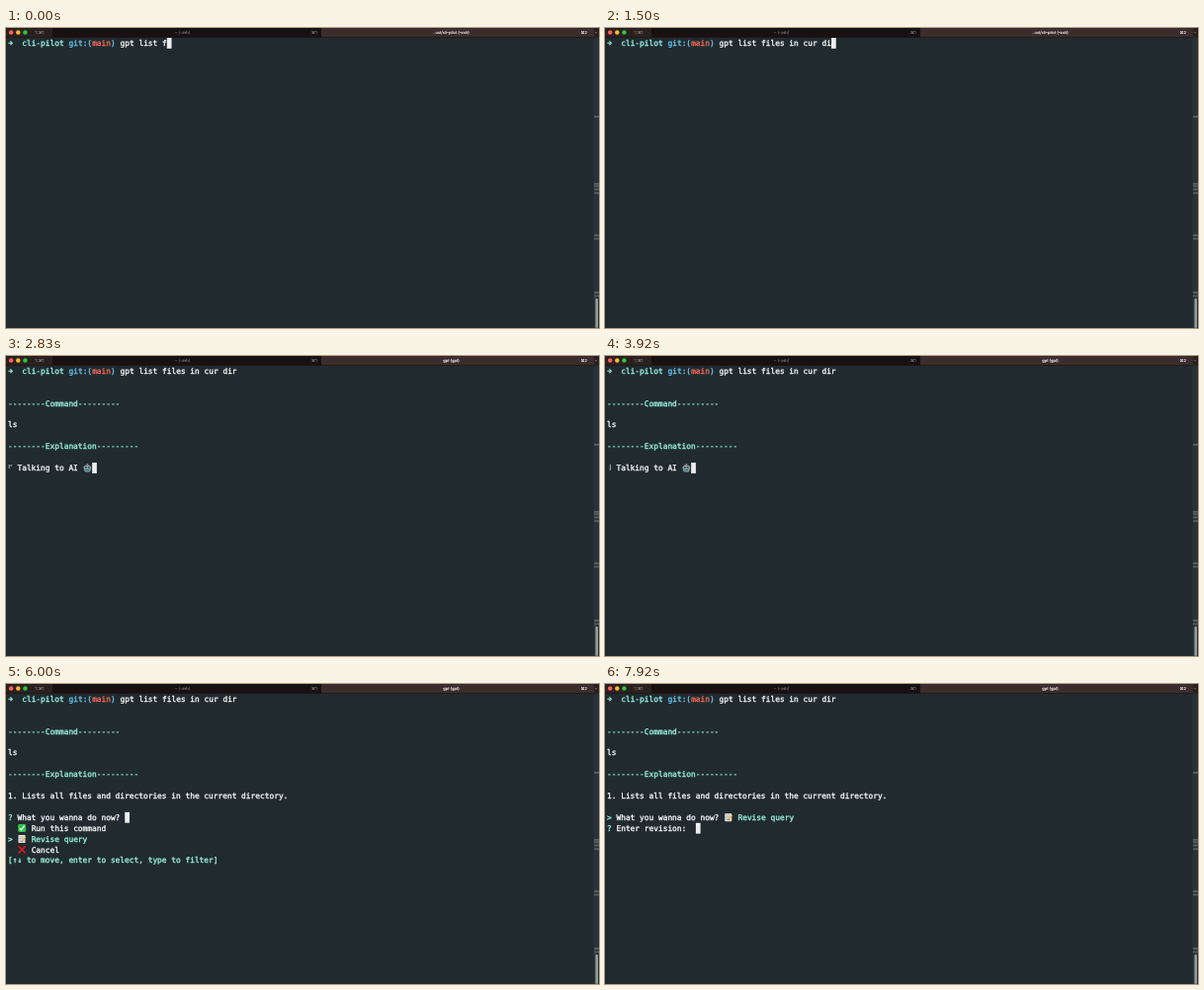
Recreate the animation shown at these times as an HTML page. Size 600 px wide and 304 px high, loop 8 s.

```html
<!DOCTYPE html>
<html lang="en">
<head>
<meta charset="utf-8">
<title>Terminal session</title>
<style>
  html, body { margin: 0; width: 100%; height: 100%; overflow: hidden; background: #212b2f; }
  svg { display: block; width: 100vw; height: 100vh; }
  text { white-space: pre; text-rendering: geometricPrecision; }
  .term { font: 7.857px "DejaVu Sans Mono", monospace; }
  .term text { stroke-width: .3px; }
  .tab { font: 4.05px Inter, "Open Sans", sans-serif; }
</style>
</head>
<body>
<svg viewBox="0 0 600 304" xmlns="http://www.w3.org/2000/svg">
  <rect width="600" height="304" fill="#212b2f"/>
  <g id="bar">
    <rect width="600" height="9.5" fill="#2a2020"/>
    <rect x="47" width="272" height="9.5" fill="#171112"/>
    <rect x="319" width="276" height="9.5" fill="#3a2d2c"/>
    <rect y="9" width="600" height=".6" fill="#171314"/>
    <circle cx="5.2" cy="4.5" r="2.2" fill="#ff5f57"/>
    <circle cx="12.3" cy="4.5" r="2.2" fill="#febc2e"/>
    <circle cx="19.4" cy="4.5" r="2.2" fill="#28c840"/>
    <g class="tab" fill="#a39c9c">
      <text x="28.5" y="6">⌥⌘1</text>
      <text x="178.5" y="6" text-anchor="middle">~ (-zsh)</text>
      <text x="309" y="6">⌘1</text>
      <g fill="#f6f2f2" stroke="#f6f2f2" stroke-width=".12">
        <text id="title" x="450.5" y="6" text-anchor="middle"></text>
        <text x="581.5" y="6">⌘2</text>
      </g>
    </g>
    <rect x="596.2" y="4" width="1.4" height="1.2" fill="#7d6a66"/>
  </g>
  <g id="scroll">
    <rect x="594.5" y="9.5" width="5.5" height="294.5" fill="#293337"/>
    <rect x="596.4" y="274" width="2.6" height="30" rx="1.3" fill="#959a9c"/>
  </g>
  <g id="screen" class="term"></g>
</svg>
<script>
const LOOP = 8000, CELL = 4.73, LINE = 10.9, LEFT = 2;
const WHITE = '#fbfdfd', CYAN = '#9afaf2', MINT = '#9cf8e6', BLUE = '#6ccbf4', RED = '#ff6a5c';
const ENTER = 1750, WAIT = 1830, HEADINGS = 2580, MENU = 4080, MOVE = 5330, CHOOSE = 6670;
const TAIL = 'iles in cur dir';
const KEY_TIMES = [80, 420, 500, 590, 670, 830, 920, 1000, 1080, 1080, 1170, 1250, 1330, 1500, 1580];
const SPINNER = '⠋⠙⠹⠸⠼⠴⠦⠧⠇⠏';
const OPTIONS = [['check', 'Run this command'], ['memo', 'Revise query'], ['cross', 'Cancel']];

const screen = document.getElementById('screen');
const title = document.getElementById('title');

const colX = col => LEFT + col * CELL;
const rowY = row => 10 + row * LINE;

const write = (col, row, str, ink = WHITE) =>
  `<text x="${colX(col)}" y="${rowY(row) + 7.9}" fill="${ink}" stroke="${ink}">${str.replace(/>/g, '&gt;')}</text>`;

const cursor = (col, row) =>
  `<rect x="${colX(col)}" y="${rowY(row)}" width="${CELL}" height="10.8" fill="#eceff0"/>`;

// Icons are drawn in a box two cells wide and one line high.
const ICONS = {
  check: `<rect x=".7" y="1.2" width="8" height="8" rx="1.4" fill="#2fc24a"/>
    <path d="M2.5 5.4 4.1 7.2 7 2.9" fill="none" stroke="#fff" stroke-width="1.3"/>`,
  memo: `<rect x="1" y="1.3" width="7" height="8" rx=".6" fill="#e6e4dd"/>
    <path d="M2 3.2h4.5M2 4.8h4M2 6.4h2.6M2 8h4.6" stroke="#8e969a" stroke-width=".5"/>
    <path d="M4.8 7.4 8.4 3.2" stroke="#e5ad3a" stroke-width="1.4"/>
    <path d="M4.2 8.1 4.9 7.3" stroke="#4a3a2c" stroke-width=".9"/>`,
  cross: `<path d="M1.6 2 7.8 8.4M7.8 2 1.6 8.4" stroke="#dc1a14" stroke-width="1.6" stroke-linecap="round"/>`,
  robot: `<rect x="3.9" y=".9" width="1.5" height="2" fill="#c5694f"/>
    <rect x=".6" y="4" width="8.1" height="2.6" rx="1" fill="#b9784f"/>
    <rect x="1.4" y="2.3" width="6.5" height="7" rx="1.7" fill="#7fa3ac"/>
    <circle cx="3.2" cy="4.8" r=".9" fill="#23464f"/><circle cx="6.1" cy="4.8" r=".9" fill="#23464f"/>
    <rect x="2.8" y="7" width="3.7" height="1.1" fill="#3b5a62"/>`
};
const icon = (name, col, row) =>
  `<g transform="translate(${colX(col)} ${rowY(row)})">${ICONS[name]}</g>`;

function spinner(t, row) {
  const step = Math.floor((t + 45) * 12 / 1000) - 34;
  const bits = SPINNER.charCodeAt((step % 10 + 10) % 10) - 0x2800;
  let out = '';
  for (let i = 0; i < 6; i++) {
    if (bits >> i & 1) {
      const x = LEFT + 1.2 + Math.floor(i / 3) * 2.1, y = rowY(row) + 2.8 + i % 3 * 2;
      out += `<circle cx="${x}" cy="${y}" r=".65" fill="${WHITE}"/>`;
    }
  }
  return out + write(2, row, 'Talking to AI') + icon('robot', 16, row) + cursor(18, row);
}

function prompt(t) {
  const query = 'gpt list f' + TAIL.slice(0, KEY_TIMES.filter(k => k <= t).length);
  return `<path d="M2.4 15.3H5.2M4.4 13.4 6.3 15.3 4.4 17.2" fill="none" stroke="${MINT}" stroke-width="1.1"/>`
    + write(3, 0, 'cli-pilot', CYAN)
    + write(13, 0, 'git:(', BLUE) + write(18, 0, 'main', RED) + write(22, 0, ')', BLUE)
    + write(24, 0, query)
    + (t < ENTER ? cursor(24 + query.length, 0) : '');
}

const headings = () =>
  write(0, 3, '--------Command---------', MINT) + write(0, 5, 'ls')
  + write(0, 7, '--------Explanation---------', MINT);

function menu(selected) {
  let out = write(0, 11, '?', MINT) + write(2, 11, 'What you wanna do now?') + cursor(25, 11);
  OPTIONS.forEach(([name, label], i) => {
    const on = i === selected, row = 12 + i;
    out += (on ? write(0, row, '>', MINT) : '') + icon(name, 2, row) + write(5, row, label, on ? MINT : WHITE);
  });
  return out + write(0, 15, '[↑↓ to move, enter to select, type to filter]', MINT);
}

const revision = () =>
  write(0, 11, '>', MINT) + write(2, 11, 'What you wanna do now?')
  + icon('memo', 25, 11) + write(28, 11, 'Revise query', MINT)
  + write(0, 12, '?', MINT) + write(2, 12, 'Enter revision:') + cursor(19, 12);

function view(t) {
  let out = prompt(t);
  if (t >= ENTER && t < WAIT) out += cursor(0, 1);
  if (t >= WAIT && t < HEADINGS) out += spinner(t, 1);
  if (t >= HEADINGS) out += headings();
  if (t >= HEADINGS && t < MENU) out += spinner(t, 9);
  if (t >= MENU) {
    out += write(0, 9, '1. Lists all files and directories in the current directory.');
    out += t < CHOOSE ? menu(t < MOVE ? 0 : 1) : revision();
  }
  return out;
}

document.getElementById('scroll').insertAdjacentHTML('beforeend',
  [89, 157, 159.4, 162.6, 166.4, 209.2, 212.6, 267.2, 270.6]
    .map(y => `<rect x="595" y="${y}" width="5" height="1.8" fill="#596164"/>`).join(''));

let shown = '';
function draw(now) {
  const t = now % LOOP, next = view(t);
  if (next !== shown) {
    screen.innerHTML = shown = next;
    title.textContent = t < ENTER ? '..ust/cli-pilot (-zsh)' : 'gpt (gpt)';
  }
}

const start = performance.now();
function tick() {
  draw(performance.now() - start);
  requestAnimationFrame(tick);
}
tick();
</script>
</body>
</html>
```
